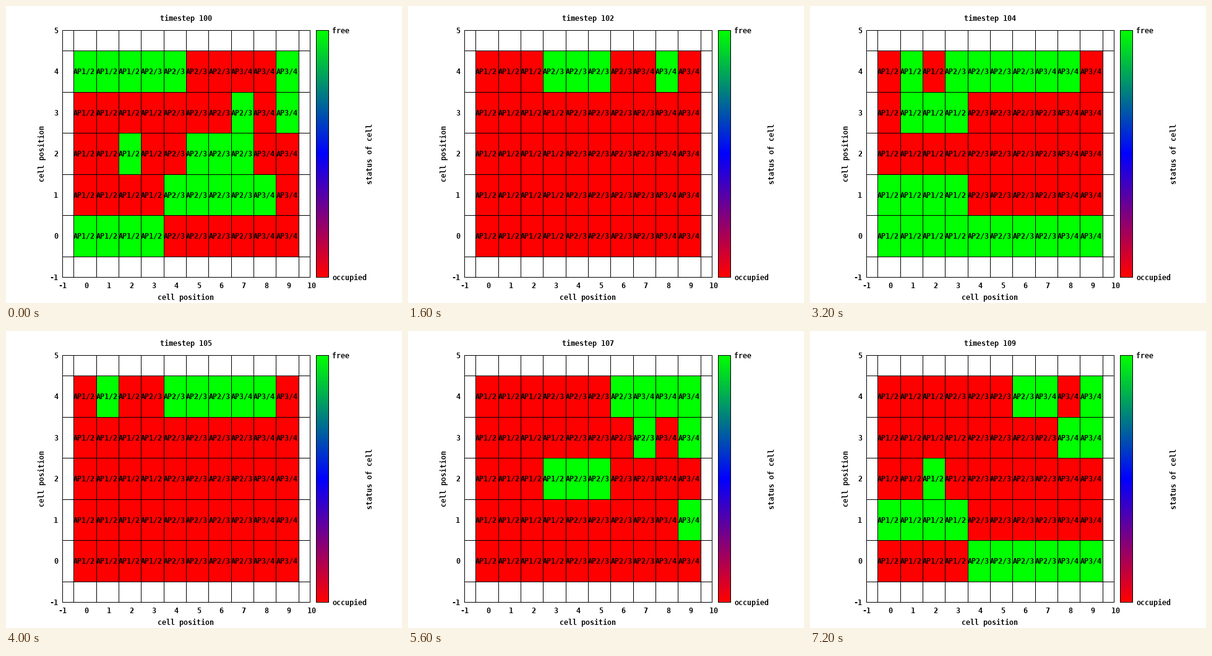
Animation, 640 px wide and 480 px high, one loop 8 s. Source, as a matplotlib script:

```python
import numpy as np
import matplotlib.pyplot as plt
from matplotlib.animation import FuncAnimation
from matplotlib.colors import LinearSegmentedColormap

plt.rcParams.update({
    "font.family": "DejaVu Sans Mono",
    "font.weight": "bold",
    "text.hinting": "native",
    "text.hinting_factor": 8,
})

W, H, DPI = 640, 480, 100
LEFT, RIGHT, TOP, BOTTOM = 91, 491, 39, 438
BAR_LEFT, BAR_RIGHT = 501, 521
COLS, ROWS = 10, 5
CELL_W = (RIGHT - LEFT) / (COLS + 1)
CELL_H = (BOTTOM - TOP) / (ROWS + 1)
CHAR = 7                                # character advance in pixels
FONT_PT = CHAR / 0.602 * 72 / DPI
HALF_CAP = 4
FIRST_STEP = 100

# Free columns of each row, top row first, one line per timestep
FREE = [
    ("012349", "79", "2567", "45678", "0123"),
    ("023459", "9", "0134", "", ""),
    ("3458", "", "", "", ""),
    ("3458", "", "", "9", ""),
    ("1345678", "123", "", "0123", "0123456789"),
    ("145678", "", "", "", ""),
    ("012456789", "04569", "06789", "45678", ""),
    ("6789", "79", "345", "9", ""),
    ("679", "9", "", "9", "0123456789"),
    ("679", "89", "2", "0123", "456789"),
]


def status(step):
    return np.array([[float(str(c) in row) for c in range(COLS)]
                     for row in FREE[step]])


def cell_label(row, col):
    first, second = (3, 7) if row == 4 else (4, 8)
    if col < first:
        return "AP1/2"
    return "AP2/3" if col < second else "AP3/4"


fig = plt.figure(figsize=(W / DPI, H / DPI), dpi=DPI, facecolor="white")
ax = fig.add_axes([0, 0, 1, 1])
ax.axis("off")


def col_x(v):
    return LEFT + CELL_W * (v + 1)


def row_y(v):
    """Pixel row on which text for the value v is centred."""
    return np.floor(BOTTOM - CELL_H * (v + 1) + 1)


def write(x, cy, s):
    """Text starting at x, with its capitals centred on cy."""
    return ax.text(np.floor(x), cy + HALF_CAP, s, size=FONT_PT,
                   ha="left", va="baseline")


def write_centred(cx, cy, s):
    return write(cx - CHAR * len(s) / 2, cy, s)


def write_upward(cx, cy, s):
    ax.text(cx + HALF_CAP, np.floor(cy + CHAR * len(s) / 2), s, size=FONT_PT,
            rotation=90, rotation_mode="anchor", ha="left", va="baseline")


# One-pixel lines lie on pixel centres, so snapping must stay off
LINE = dict(colors="black", lw=72 / DPI, antialiased=False, snap=False,
            zorder=2)


def vlines(xs):
    ax.vlines(np.asarray(xs) + 0.5, TOP, BOTTOM + 1, **LINE)


def hlines(ys, x0, x1):
    ax.hlines(np.asarray(ys) + 0.5, x0, x1 + 1, **LINE)


cmap = LinearSegmentedColormap.from_list(
    "status", ["#ff0000", "#0000ff", "#00ff00"], N=256)

# Cells and grid
xs = np.floor(LEFT + CELL_W * (np.arange(COLS + 1) + 0.5) + 0.5)
ys = np.floor(TOP + CELL_H * (np.arange(ROWS + 1) + 0.5) + 0.5)
mesh = ax.pcolormesh(xs + 0.5, ys + 0.5, status(0), cmap=cmap, vmin=0, vmax=1,
                     antialiased=False, zorder=1)
vlines([LEFT, *xs, RIGHT])
hlines([TOP, *ys, BOTTOM], LEFT, RIGHT)

# Colour bar
ax.imshow(np.linspace(1, 0, BOTTOM - TOP)[:, None], cmap=cmap, vmin=0, vmax=1,
          extent=(BAR_LEFT, BAR_RIGHT, BOTTOM, TOP), aspect="auto",
          interpolation="nearest", zorder=1)
vlines([BAR_LEFT, BAR_RIGHT])
hlines([TOP, BOTTOM], BAR_LEFT, BAR_RIGHT)
write(527, row_y(ROWS), "free")
write(527, row_y(-1), "occupied")
write_upward(588, 239, "status of cell")

# Cell labels
for row in range(ROWS):
    for col in range(COLS):
        write_centred(col_x(col), row_y(row), cell_label(row, col))

# Tick labels keep a blank in place of the plus sign
for v in range(-1, COLS + 1):
    write_centred(col_x(v), 452, f"{v: d}")
for v in range(-1, ROWS + 1):
    write(84 - CHAR * len(str(v)), row_y(v), str(v))

write_centred(291, 471, "cell position")
write_upward(58, 239, "cell position")
title = write_centred(291, 20, f"timestep {FIRST_STEP}")

ax.set_xlim(0, W)
ax.set_ylim(H, 0)


def update(step):
    mesh.set_array(status(step))
    title.set_text(f"timestep {FIRST_STEP + step}")
    return mesh, title


anim = FuncAnimation(fig, update, frames=len(FREE), interval=800,
                     repeat=True, repeat_delay=0)
plt.show()
```
